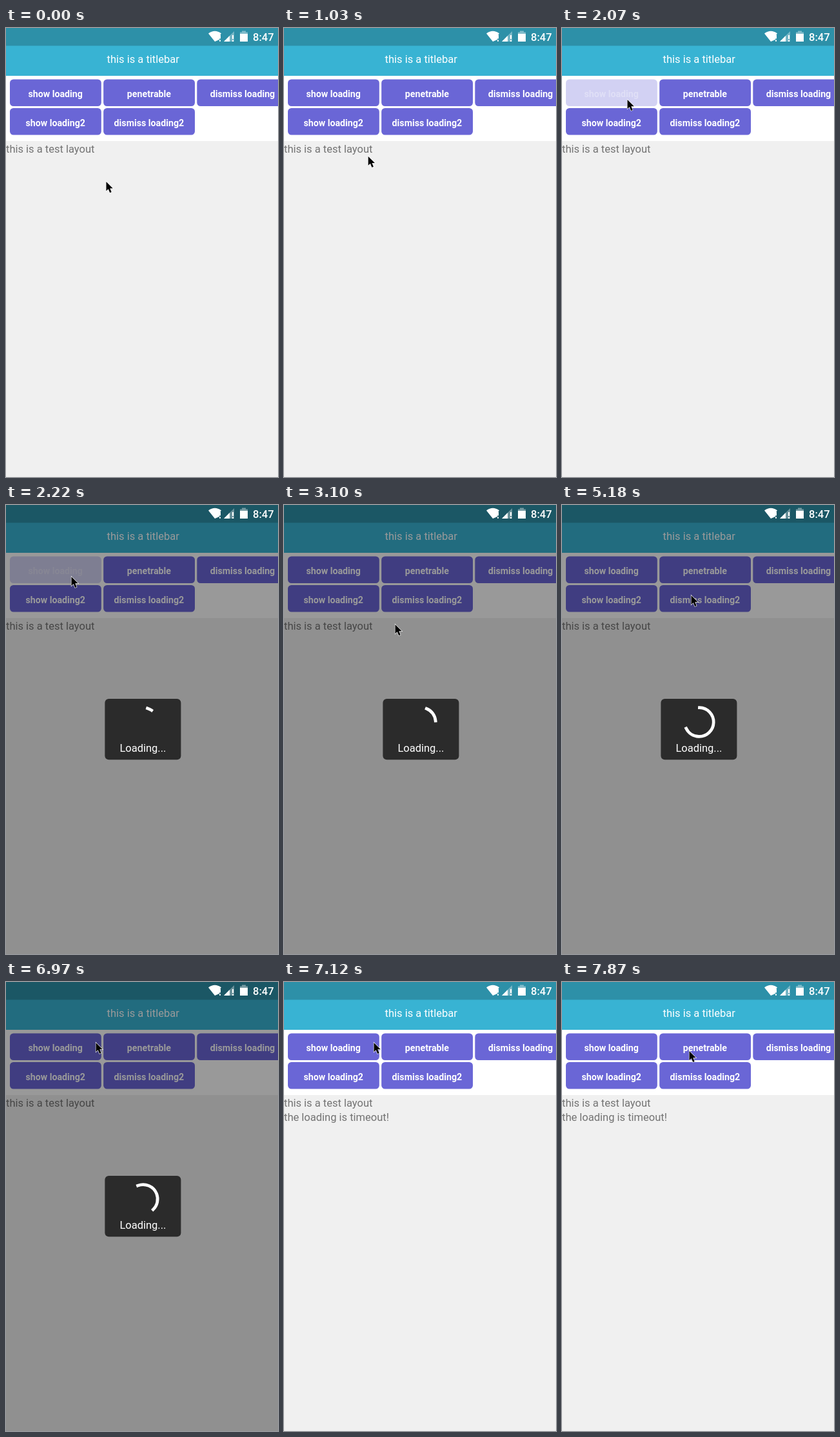
Recreate the animation shown at these times as an HTML page. Size 422 px wide and 695 px high, loop 8000 ms.

```html
<!DOCTYPE html>
<html lang="en">
<head>
<meta charset="utf-8">
<title>Loading dialog</title>
<style>
  html, body { margin: 0; width: 100%; height: 100%; overflow: hidden; background: #f0f0f0; }
  svg { display: block; width: 100vw; height: 100vh; }
  text { font-family: Roboto, sans-serif; font-size: 16.5px; fill: #fff; }
  .mid { text-anchor: middle; }
  .body { fill: #737373; }
  .btn rect { fill: #6a66d6; }
  .btn text { font-size: 14.2px; font-weight: 700; text-anchor: middle; }
  .pressed > * { opacity: .3; }
</style>
</head>
<body>
<svg viewBox="0 0 422 695">
  <rect width="422" height="695" fill="#f0f0f0"/>
  <rect y="73" width="422" height="102" fill="#fff"/>
  <rect width="422" height="74" fill="#38b3d3"/>
  <rect width="422" height="27.5" fill="#2d90a8"/>
  <text class="mid" x="212.7" y="54">this is a titlebar</text>
  <g id="buttons"></g>
  <text class="body" x="0" y="193">this is a test layout</text>
  <text class="body" id="timeout" x="0" y="215">the loading is timeout!</text>

  <rect id="dim" width="422" height="695" opacity=".4"/>

  <g fill="#fff">
    <path d="M314 8.5Q324 1 334 8.5L331 12V18L324 21Z"/>
    <path d="M331 10.5h2v6h-2zM331 18.5h2v2.2h-2z"/>
    <path d="M354 5V21H338Z" opacity=".35"/>
    <path d="M347 12V21H338Z"/>
    <path d="M351 11h2v6h-2zM351 18.7h2v2.2h-2z"/>
    <path d="M366 4.5h6v2h3v3h-12v-3h3z" opacity=".4"/>
    <path d="M363 9h12v12h-12z"/>
    <text x="383" y="19.5" font-weight="500">8:47</text>
  </g>

  <g id="dialog">
    <rect x="153.4" y="300" width="118" height="94.3" rx="6" fill="#2b2b2b"/>
    <circle id="arc" r="22.4" pathLength="360" fill="none" stroke="#fff" stroke-width="4.7" stroke-linecap="square"/>
    <text class="mid" x="212.4" y="382">Loading...</text>
  </g>

  <path id="cursor" d="M0 0V14.2L3.2 11.2L5.7 17L8.2 16L5.8 10.3H10.3Z" stroke="#fff" stroke-width="1.2" paint-order="stroke"/>
</svg>
<script>
const LOOP = 8000, STEP = 148.4, LEAD = 18, LAST = 53;
const PRESS = 14, OPEN = 15, CLOSE = 48;
const $ = id => document.getElementById(id);

const labels = [
  ["show loading", 6, 79.5], ["penetrable", 151.2, 79.5], ["dismiss loading", 296.3, 79.5],
  ["show loading2", 6, 124], ["dismiss loading2", 151.2, 124]
];
$("buttons").innerHTML = labels.map(([name, x, y]) =>
  `<g class="btn"><rect x="${x}" y="${y}" width="141.8" height="41.5" rx="5.5"/>` +
  `<text x="${x + 70.7}" y="${y + 27.5}">${name}</text></g>`).join("");
const showButton = $("buttons").firstChild;

// Pointer stops: step, x, y
const stops = [
  [0, 155.5, 238], [1, 161, 250], [3, 184, 297], [5, 160, 258], [8, 116, 169],
  [10, 106, 132], [12, 101.5, 111], [16, 101.5, 111], [18, 130, 140], [21, 172.5, 185],
  [25, 205, 60], [29, 130, 102], [31, 94, 100], [35, 200.5, 140], [38, 206, 137],
  [45, 139.5, 94], [50, 139.5, 94], [52, 185, 104], [53, 197.5, 107]
];

function pointer(n) {
  const i = Math.max(1, stops.findIndex(s => s[0] >= n));
  const [n0, x0, y0] = stops[i - 1], [n1, x1, y1] = stops[i];
  const k = (n - n0) / (n1 - n0);
  return [x0 + (x1 - x0) * k, y0 + (y1 - y0) * k];
}

// Eased half of the cycle: cubic through (.2, 0), (.1, 1) to (.5, 1)
function trim(x) {
  if (x <= 0) return 0;
  if (x >= .5) return 1;
  let lo = 0, hi = 1;
  for (let i = 0; i < 24; i++) {
    const u = (lo + hi) / 2, v = 1 - u;
    if (.6 * u * v * v + .3 * u * u * v + .5 * u ** 3 < x) lo = u; else hi = u;
  }
  return lo * lo * (3 - 2 * lo);
}

function spin(ms) {
  const cycle = (ms / 1333) % 1;
  const base = ms * .108 + 90 * cycle;
  const from = 270 * trim(cycle - .5), to = 270 * trim(cycle);
  $("arc").setAttribute("stroke-dasharray", `${to - from} 720`);
  $("arc").setAttribute("transform", `translate(212.8 336) rotate(${base + from - 90})`);
}

function draw(now) {
  const n = Math.min(LAST, Math.floor((now % LOOP + LEAD) / STEP));
  const open = n >= OPEN && n < CLOSE;
  $("dim").style.display = $("dialog").style.display = open ? "" : "none";
  $("timeout").style.display = n >= CLOSE ? "" : "none";
  showButton.classList.toggle("pressed", n === PRESS || n === OPEN);
  if (open) spin(100 + (n - OPEN) * STEP * 1.006);
  $("cursor").setAttribute("transform", `translate(${pointer(n)})`);
}

const start = performance.now();
function tick() {
  draw(performance.now() - start);
  requestAnimationFrame(tick);
}
tick();
</script>
</body>
</html>
```
